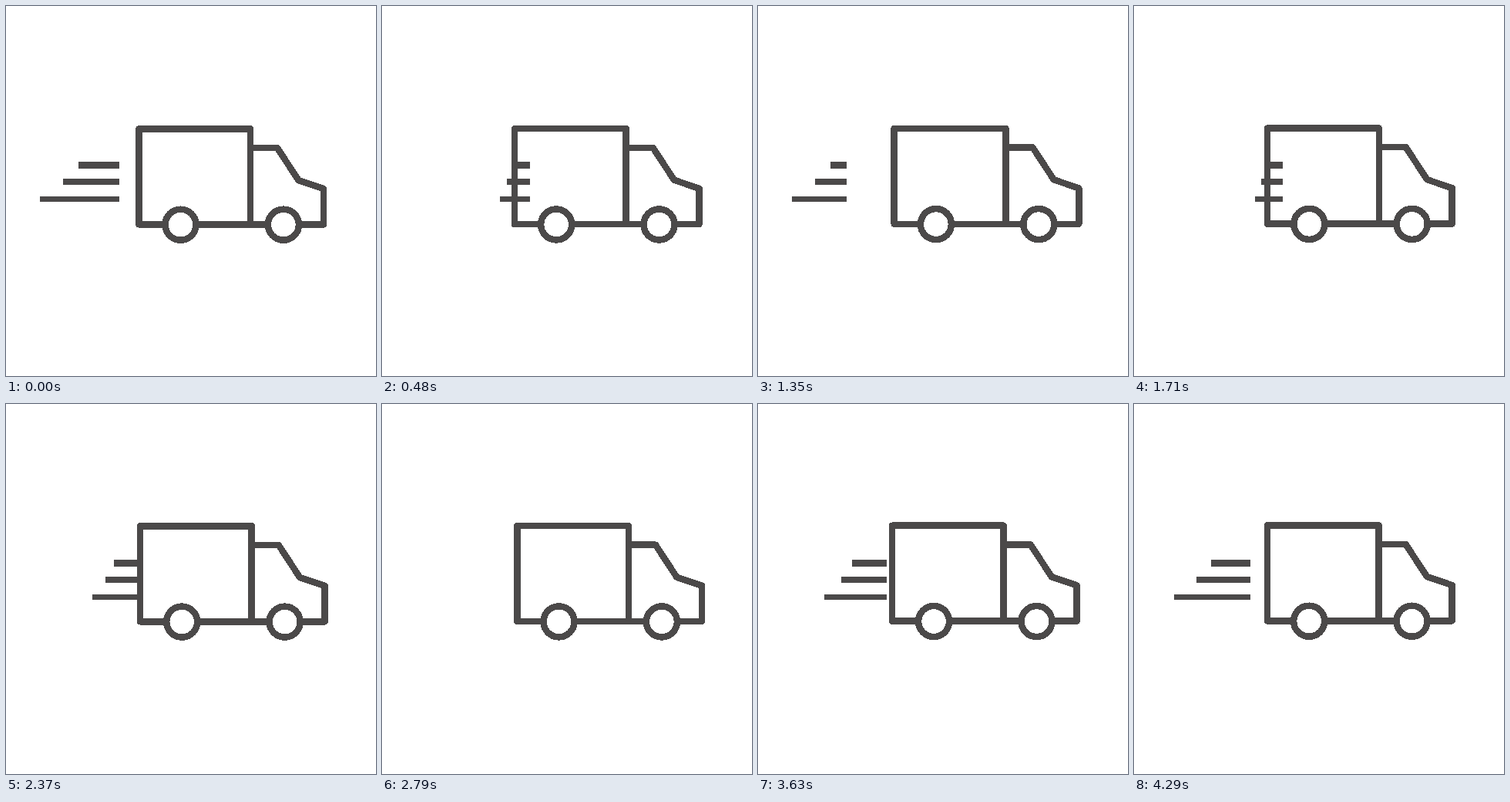
Recreate the animation shown at these times as an HTML page. Size 480 by 480 pixels, loop 4320 ms.

```html
<!DOCTYPE html>
<html lang="en">
<head>
<meta charset="utf-8">
<title>Delivery truck</title>
<style>
  html, body { margin: 0; width: 100%; height: 100%; overflow: hidden; background: #fff; }
  svg { display: block; width: 100%; height: 100%; }
</style>
</head>
<body>
<svg viewBox="0 0 480 480" fill="none" stroke="#4b4949" stroke-width="8.5" shape-rendering="crispEdges">
  <g id="truck" stroke-linejoin="round" stroke-linecap="round">
    <path d="M172.4 159.4H317.1V283.4H172.4Z"/>
    <path d="M317.1 184H352L379.5 226L412 237V283.4H317.1"/>
    <circle cx="226.6" cy="283.7" r="20" fill="#fff"/>
    <circle cx="360" cy="283.7" r="20" fill="#fff"/>
  </g>
  <path id="low" stroke-width="7"/>
  <path id="mid" stroke-width="8"/>
  <path id="high" stroke-width="8.4"/>
</svg>
<script>
const LOOP = 4320, STEP = 30, GUST = LOOP / 7;
const START = 197, FULL = 212; // where streaks begin, and when they are fully drawn
const streaks = [
  { id: 'low', y: 250.4, end: 44 },
  { id: 'mid', y: 228, end: 74 },
  { id: 'high', y: 206.3, end: 94 }
];

const el = id => document.getElementById(id);
const wave = turns => Math.cos(2 * Math.PI * turns);

// Smooth 0 to 1 between times a and b
function ease(a, b, t) {
  const p = Math.max(0, Math.min(1, (t - a) / (b - a)));
  return p * p * (3 - 2 * p);
}

function draw(t) {
  // Fast rattle over a slower sway, with a slight rise through the loop
  const x = 2.2 - 1.8 * wave(t / 240) + .9 * wave(t / 560 - .34);
  const y = -2 * t / LOOP;
  el('truck').setAttribute('transform', `translate(${x} ${y})`);

  // Heads run out to their ends; the shared tail follows and wipes the streaks away
  const u = (t + FULL) % GUST;
  const tail = START - 50 * ease(42, FULL, u) - 103 * ease(FULL, 522, u);
  for (const { id, y, end } of streaks) {
    const head = START + (end - START) * ease(0, FULL, u);
    el(id).setAttribute('d', tail > head ? `M${head} ${y}H${tail}` : '');
  }
}

const start = performance.now();
function tick() {
  const t = (performance.now() - start) % LOOP;
  draw(Math.floor(t / STEP) * STEP);
  requestAnimationFrame(tick);
}
tick();
</script>
</body>
</html>
```
